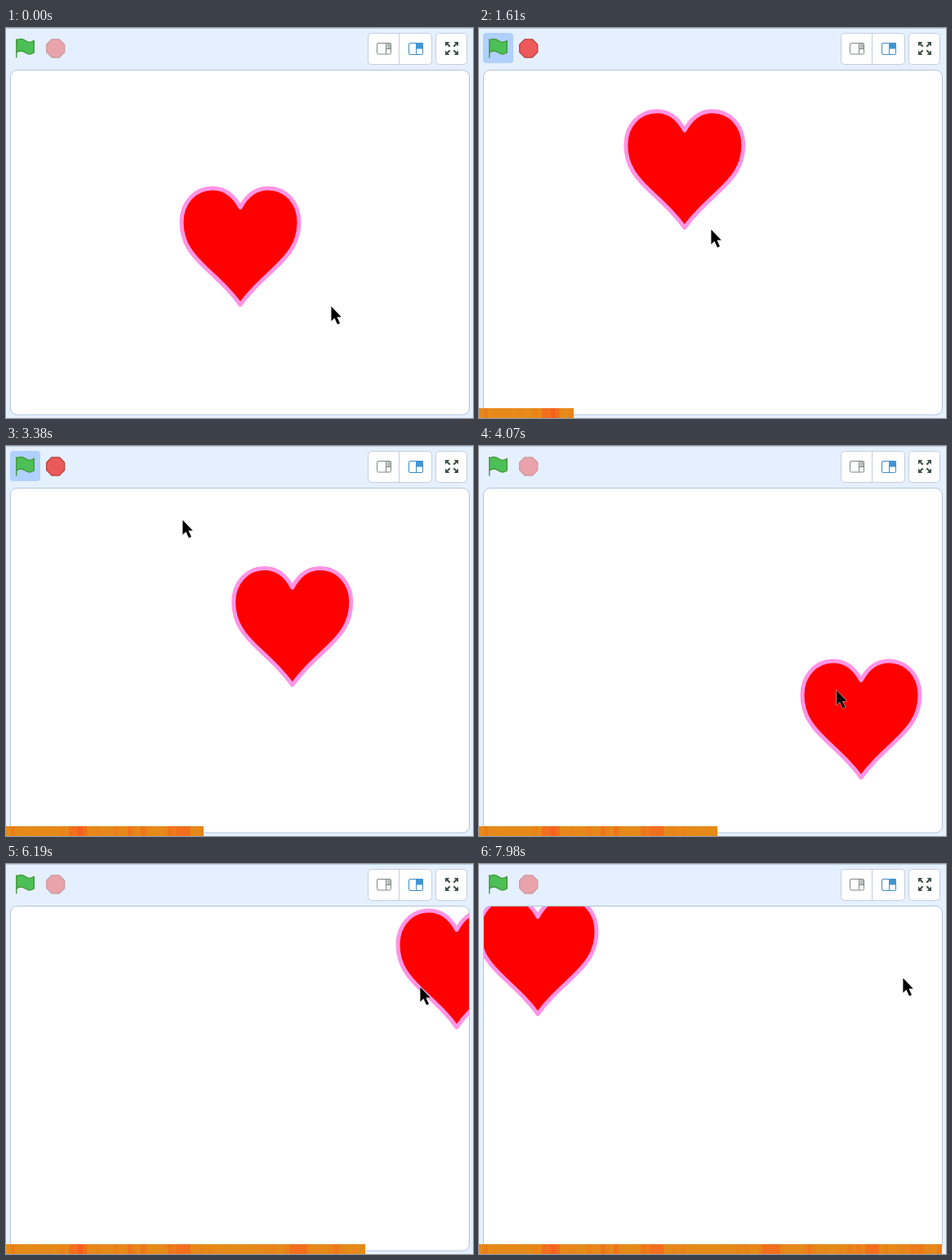
An HTML page for the animation above (8050 ms loop, 572 by 477 pixels).

```html
<!DOCTYPE html>
<html lang="en">
<head>
<meta charset="utf-8">
<title>Gliding heart</title>
<style>
html, body { margin: 0; width: 100%; height: 100%; overflow: hidden; background: #e5f0ff; }
svg { display: block; width: 572px; height: 477px; }
</style>
</head>
<body>
<svg viewBox="0 0 572 477">
  <defs>
    <clipPath id="inside"><rect x="6" y="52" width="561" height="421" rx="7"/></clipPath>
  </defs>
  <rect width="572" height="477" fill="#e5f0ff"/>
  <rect width="572" height="1" fill="#bccbe0"/>

  <rect id="glow" x="5" y="6" width="37" height="37" rx="4" fill="#b0d1ff"/>
  <g transform="translate(11.7 12.6) scale(1.4)" fill="#4cbf56" stroke="#45993d" stroke-linecap="round" stroke-linejoin="round">
    <path d="M.75 2A6.44 6.44 0 0 1 8.44 2A6.44 6.44 0 0 0 16.13 2V12.4A6.44 6.44 0 0 1 8.44 12.4A6.44 6.44 0 0 0 .75 12.4"/>
    <path d="M.75 16.75V.75"/>
  </g>
  <path id="stop" transform="translate(48.8 13) scale(1.7)" fill="#ec5959" stroke="#b84848" stroke-width=".8" stroke-linejoin="round"
    d="M4.3 .5H9.7L13.5 4.3V9.7L9.7 13.5H4.3L.5 9.7V4.3Z"/>

  <g fill="#fff" stroke="#c5cedd">
    <rect x="443.5" y="6.5" width="78" height="38" rx="4"/>
    <rect x="526.5" y="6.5" width="38" height="38" rx="4"/>
    <path d="M481.5 7V44"/>
  </g>
  <g stroke="#7f8a86" fill="none">
    <rect x="454.5" y="18.5" width="17" height="13.5" rx="1.5"/>
    <path d="M465.5 18.5V32M465.5 25.5H471.5"/>
    <rect x="466.5" y="19" width="4.5" height="6" fill="#b5bdb9" stroke="none"/>
  </g>
  <g stroke="#3f8cc4" fill="none">
    <rect x="493.5" y="18.5" width="17" height="14" rx="1.5"/>
    <path d="M502.5 18.5V32.5"/>
    <rect x="502" y="18" width="9" height="7.5" rx="1" fill="#3f96d2" stroke="none"/>
  </g>
  <g id="arrows" transform="translate(546 25)"></g>

  <rect x="5.5" y="51.5" width="562" height="421.5" rx="8" fill="#fff" stroke="#b3c3dc"/>
  <g clip-path="url(#inside)">
    <path id="heart" fill="#f00" stroke="#ff94e4" stroke-width="5" stroke-linejoin="round"
      d="M0 -121.5C-8 -136.5 -19 -145 -34 -145C-56 -145 -72 -127 -72 -103.5C-72 -77 -58 -62 -41 -46C-24 -30 -11 -18 0 -2.5C11 -18 24 -30 41 -46C58 -62 72 -77 72 -103.5C72 -127 56 -145 34 -145C19 -145 8 -136.5 0 -121.5Z"/>
  </g>
  <path id="cursor" stroke="#fff" stroke-width=".8" paint-order="stroke"
    d="M.4 .4V18.4L4.4 14.7L8 22.4L11 21L7.4 13.6H12.8Z"/>
  <g id="bar"></g>
</svg>
<script>
const LOOP = 8050, STEPS = 104, CELL = 5.5;
const GLIDE = 12.9, REACH = 7; // durations in steps
const $ = id => document.getElementById(id);

// Key points: start step, x, y
const glides = [[13.8, 224, 172], [37.3, 468, 408], [62.8, 552, 202], [85.2, 72, 186]];
const reaches = [[3, 284, 246], [26, 216, 90], [47, 450.5, 310.5], [72, 507, 150], [80, 519, 139]];

const linear = k => k;
const smooth = k => k * k * (3 - 2 * k);
const noise = i => Math.abs(Math.sin(i * 12.9898) * 43758.5453) % 1;

function follow([x, y], keys, step, length, ease) {
  for (const [start, toX, toY] of keys) {
    const k = ease(Math.max(0, Math.min(1, (step - start) / length)));
    x += (toX - x) * k;
    y += (toY - y) * k;
  }
  return `translate(${x} ${y})`;
}

const within = (step, length) => glides.some(([start]) => step >= start && step < start + length);

// Progress cells turn redder just after each click
function tint(i) {
  const heat = 0.4 * within(i, 3.5) + 0.35 * noise(i) ** 6;
  return `hsl(${33 - 24 * heat} ${80 + 20 * heat}% ${50 + 7 * heat}%)`;
}

for (let i = 0; i < STEPS - 1; i++) {
  $('bar').innerHTML += `<rect x="${i * CELL}" y="465" width="${CELL}" height="12"
    fill="${tint(i)}" shape-rendering="crispEdges"/>`;
}
const cells = [...$('bar').children];

for (let turn = 0; turn < 360; turn += 90) {
  $('arrows').innerHTML += `<path d="M8 -8V-2.6L6 -4.6L3 -1.6L1.6 -3L4.6 -6L2.6 -8Z"
    fill="#3d5245" transform="rotate(${turn})"/>`;
}

function draw(t) {
  const step = Math.min(STEPS - 1, Math.floor(t / LOOP * STEPS + 0.55));
  const running = within(step, GLIDE + 0.8);
  $('heart').setAttribute('transform', follow([287, 341], glides, step, GLIDE, linear));
  $('cursor').setAttribute('transform', follow([398, 340], reaches, step, REACH, smooth));
  $('glow').style.opacity = running ? 1 : 0;
  $('stop').style.opacity = running ? 1 : 0.5;
  cells.forEach((cell, i) => cell.style.display = i < step ? '' : 'none');
}

const begin = performance.now();
function run() {
  draw((performance.now() - begin) % LOOP);
  requestAnimationFrame(run);
}
run();
</script>
</body>
</html>
```
